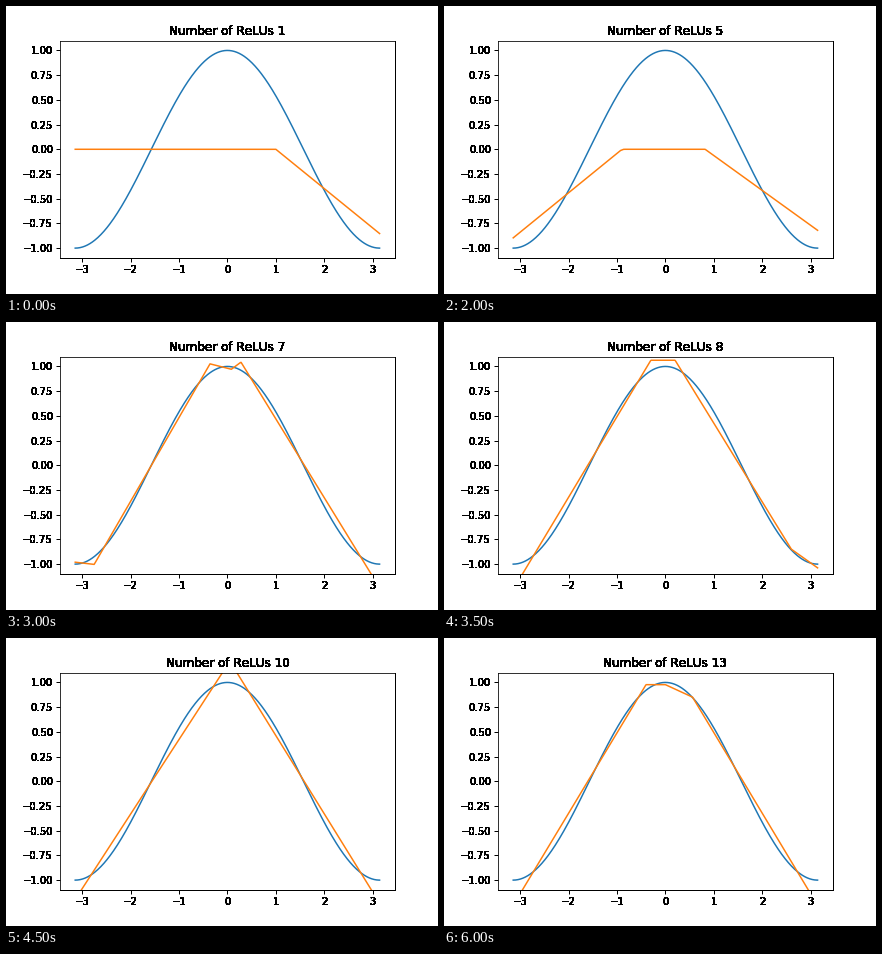
Recreate the animation shown at these times as a matplotlib script. Size 432 by 288 pixels, loop 6.5 s.

```python
import numpy as np
import matplotlib.pyplot as plt
from matplotlib.animation import FuncAnimation
from matplotlib.text import Text
from matplotlib.transforms import IdentityTransform

plt.rcParams["font.family"] = "DejaVu Sans"
plt.rcParams["text.kerning_factor"] = 6  # whole-pixel kerning

PI = np.pi
WIDTH, HEIGHT, DPI = 432, 288, 72
RIDGE = 0.6

# Kinks of the active units per fit: (facing left, facing right, has bias).
KINKS = [
    ([], [1.0], False),
    ([], [-1.55, 0.3], False),
    ([-0.95, 0.39], [], False),
    ([-0.2], [0.6], True),
    ([-0.93, -0.86], [0.82], False),
    ([-0.4], [0.3, 2.6], True),
    ([-2.75, -0.36, 0.08], [0.08, 0.28], True),
    ([-0.3], [0.2, 2.6], True),
    ([-0.04], [-0.04], True),
    ([0.05], [0.05], True),
    ([0.21], [0.21], True),
    ([-0.5], [0.3], True),
    ([-0.4], [0, 0.56], True),
]

xs = np.linspace(-PI, PI, 500)
wave = np.cos(xs)


def relu_fit(left, right, bias):
    """Least-squares sum of ReLUs; fits without a bias are damped."""
    units = [np.maximum(0, c - xs) for c in left]
    units += [np.maximum(0, xs - c) for c in right]
    if bias:
        units.append(np.ones_like(xs))
    basis = np.array(units)
    dx = xs[1] - xs[0]
    damping = 0 if bias else RIDGE
    gram = basis @ basis.T * dx + damping * np.eye(len(units))
    return np.linalg.solve(gram, basis @ wave * dx) @ basis


class SolidText(Text):
    """Text whose soft edges are built up to full black."""

    def draw(self, renderer):
        for _ in range(40):
            super().draw(renderer)


def add_label(x, y, text, size, ha, va):
    label = SolidText(x, y, text, fontsize=size, ha=ha, va=va,
                      transform=IdentityTransform())
    fig.add_artist(label)
    return label


def signed(value, spec):
    return format(value, spec).replace("-", "\u2212")


fig = plt.figure(figsize=(WIDTH / DPI, HEIGHT / DPI), dpi=DPI,
                 facecolor="white")
ax = fig.add_axes([0.125, 0.125, 0.775, 0.755])
ax.set_xlim(-1.1 * PI, 1.1 * PI)
ax.set_ylim(-1.1, 1.1)

x_ticks = np.arange(-3, 4)
y_ticks = np.arange(-4, 5) / 4
ax.set_xticks(x_ticks)
ax.set_yticks(y_ticks)
ax.tick_params(labelbottom=False, labelleft=False, length=4, width=1)
ax.spines[["bottom", "right"]].set_linewidth(1)
ax.spines[["top", "left"]].set_linewidth(0.8)

# Labels sit 7 px outside the axes, the title 6 px above them.
box = ax.bbox
for x in x_ticks:
    px = ax.transData.transform((x, 0))[0]
    add_label(px, box.y0 - 7, signed(x, "d"), 10, "center", "top")
for y in y_ticks:
    py = ax.transData.transform((0, y))[1]
    add_label(box.x0 - 7, py, signed(y, ".2f"), 10, "right",
              "center_baseline")
title = add_label((box.x0 + box.x1) / 2, box.y1 + 6, "", 12,
                  "center", "baseline")

ax.plot(xs, wave, color="#1f77b4", lw=1.5)
fit_line, = ax.plot([], [], color="#ff7f0e", lw=1.5)


def update(i):
    fit_line.set_data(xs, relu_fit(*KINKS[i]))
    title.set_text(f"Number of ReLUs {i + 1}")
    return fit_line, title


anim = FuncAnimation(fig, update, frames=len(KINKS), interval=500,
                     repeat=True, repeat_delay=0, blit=False)

plt.show()
```
